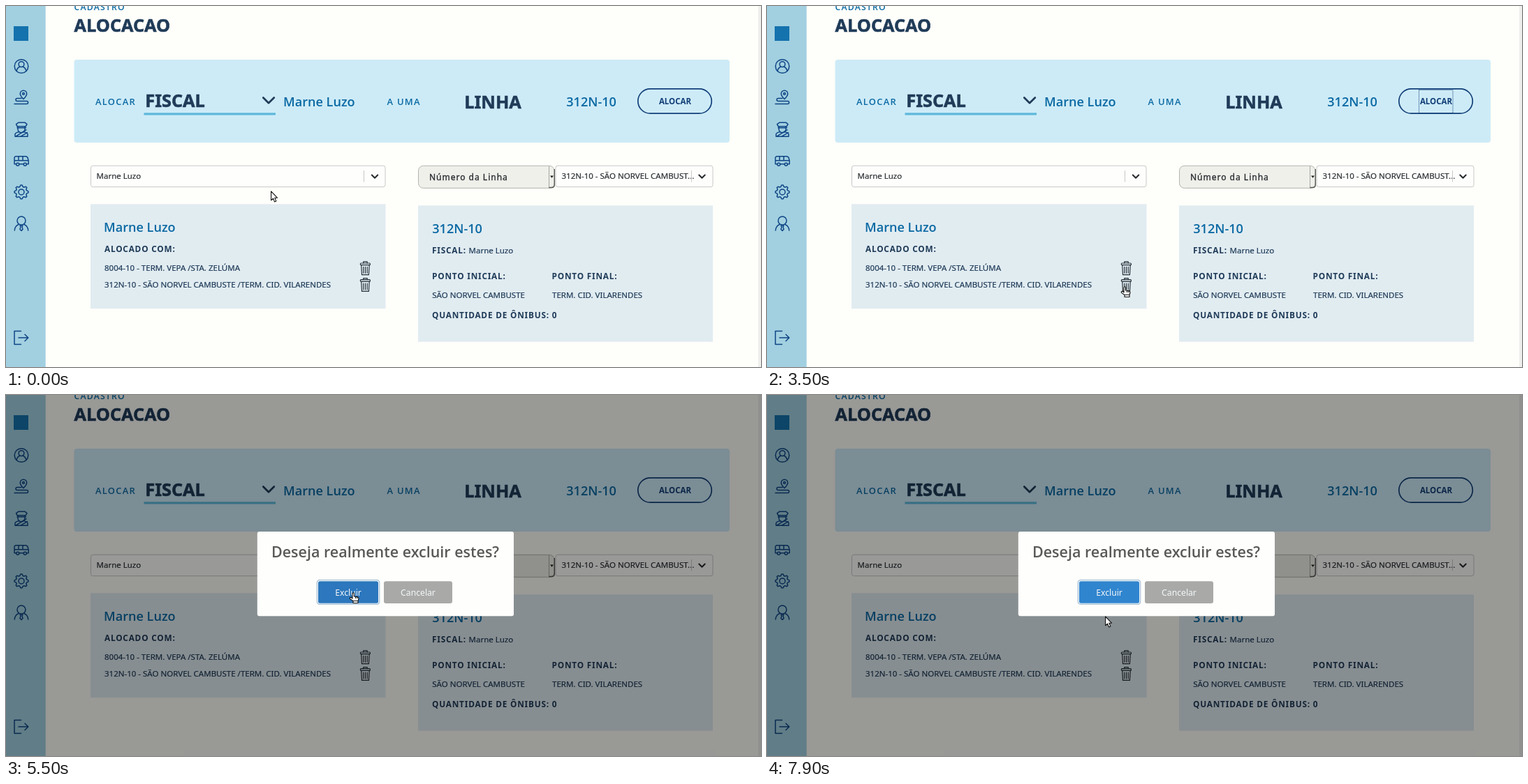
An HTML page for the animation above (8000 ms loop, 1081x518 px).

```html
<!DOCTYPE html>
<html lang="pt-BR">
<head>
<meta charset="utf-8">
<title>Alocação</title>
<style>
  html, body { margin: 0; width: 100%; height: 100%; overflow: hidden; background: #fefefa; }
  svg { display: block; width: 100%; height: 100%; }
  text { font: 500 11.5px "Noto Sans", "Open Sans", sans-serif; fill: #1f3b58; stroke: #1f3b58; stroke-width: .2; white-space: pre; }
  .heading { font-size: 25.3px; font-weight: 700; stroke-width: .6; }
  .name, .tag, .question { font-family: "Open Sans", "Noto Sans", sans-serif; font-weight: 600; stroke: none; }
  .name { font-size: 18.1px; fill: #0a69a3; }
  .tag { font-size: 12.9px; fill: #0a69a3; letter-spacing: .1em; }
  .crumb { font-size: 12.2px; }
  .label { font-size: 11.8px; font-weight: 700; letter-spacing: .8px; stroke: none; }
  .action { font-weight: 700; fill: #123f78; stroke: none; text-anchor: middle; }
  .value { fill: #2b2f33; stroke: #2b2f33; }
  .native { font-size: 12px; letter-spacing: 1px; stroke-width: .35; }
  .question { font-size: 21.5px; fill: #595958; text-anchor: middle; }
  .choice { font-size: 12.2px; font-weight: 400; fill: #f4f7f9; stroke: none; text-anchor: middle; }
  .line { fill: none; stroke: #0f4585; stroke-width: 1.5; stroke-linecap: round; stroke-linejoin: round; }
  .field { fill: #fefefc; stroke: #c8c9c8; }
  .chevron { fill: none; stroke: #2a2d30; stroke-width: 2.1; stroke-linecap: round; stroke-linejoin: round; }
  .pointer { fill: #fff; stroke: #111; stroke-width: 1.1; stroke-linejoin: round; }
</style>
</head>
<body>
<svg viewBox="0 0 1081 518" preserveAspectRatio="none">
  <defs>
    <path id="drop" class="chevron" d="M-4.2-2 0 2.2 4.2-2"/>
    <g id="trash" class="line" style="stroke:#27313b;stroke-width:1.2">
      <rect x=".7" y="2.7" width="14" height="2.7" rx="1"/>
      <path d="M5 2.7V.6H10.5V2.7M2 5.4 2.8 19.4H12.7L13.5 5.4M5 8V17M7.75 8V17M10.5 8V17"/>
    </g>
  </defs>

  <rect width="1081" height="518" fill="#fefefa"/>
  <rect x="1077" width="4" height="518" fill="#efefed"/>

  <rect width="56.7" height="518" fill="#a2d0e0"/>
  <rect x="11" y="29" width="21" height="21" fill="#1472ad"/>
  <g id="menu" class="line">
    <g>
      <circle r="9.8"/>
      <circle cy="-2.9" r="3.9"/>
      <path d="M-7 6.7Q-5.8 2-2.4.7M7 6.7Q5.8 2 2.4.7"/>
    </g>
    <g>
      <path d="M3 2Q-1.7-3-1.7-5.7A4.7 4.7 0 0 1 7.7-5.7Q7.7-3 3 2Z"/>
      <circle cx="3" cy="-5.7" r="1.4"/>
      <path d="M0 1H-6a2 2 0 0 0 0 4H7.6a2 2 0 0 1 0 4H-10"/>
    </g>
    <g>
      <path d="M-7.5-7-4-9.5H5L8-7 6.3-4H-6ZM-5-4V0A5 5 0 0 0 5 0V-4M-6-2H6.5"/>
      <path d="M-9 10.5V7Q-8 4.5-3 4M9 10.5V7Q8 4.5 3 4M-9 10.5H9M7 1-8 10.5M8.5 5-1 10.5"/>
    </g>
    <g>
      <path d="M-10 5V-4.5L-8.5-6H7L9-4.5 10.2.5V5ZM-10 0H10M-4-6V0M2-6V0"/>
      <circle cx="-5.2" cy="5.5" r="2" fill="#a2d0e0"/>
      <circle cx="5.3" cy="5.5" r="2" fill="#a2d0e0"/>
    </g>
    <g>
      <path id="gear"/>
      <circle r="4"/>
    </g>
    <g>
      <circle cy="-4" r="6"/>
      <path d="M-9.7 10Q-9.5 4-4 1.5M9.7 10Q9.5 4 4 1.5M-2 3H2L1 5 2 8.5 0 10.5-2 8.5-1 5Z"/>
    </g>
  </g>
  <path class="line" stroke-width="1.8" d="M21.5 466.5H12V485.5H21.5M18 476H31.5M27 471.2 31.8 476 27 480.8"/>

  <text class="tag crumb" x="97.5" y="6">CADASTRO</text>
  <text class="heading" x="97.5" y="37">ALOCACAO</text>

  <rect x="97.5" y="77" width="938.5" height="119" rx="4" fill="#cdebf7"/>
  <text class="tag" x="128" y="141.7">ALOCAR</text>
  <text class="heading" x="199.3" y="145">FISCAL</text>
  <path d="M368.3 131.5 376 139.2 383.8 131.5" class="chevron" style="stroke:#1f3b58;stroke-width:2.7"/>
  <rect x="197.5" y="153.3" width="188.5" height="3.2" fill="#5db8dc"/>
  <text class="name" x="397" y="144">Marne Luzo</text>
  <text class="tag" x="545.5" y="141.7">A UMA</text>
  <text class="heading" x="656.2" y="147">LINHA</text>
  <text class="name" x="802.3" y="144">312N-10</text>
  <rect x="904.8" y="118.8" width="105.5" height="35.4" rx="17.7" class="line" style="stroke:#123f78;stroke-width:1.7"/>
  <text class="action" x="958" y="141">ALOCAR</text>
  <rect id="focus" x="933.5" y="120.5" width="48.5" height="33" fill="none" stroke="#123f78" stroke-dasharray="1 1"/>

  <rect x="121.5" y="229.2" width="421.5" height="30.4" rx="3" class="field"/>
  <text class="value" x="129.5" y="248.3">Marne Luzo</text>
  <use href="#drop" x="528" y="244.5"/>

  <rect x="590.5" y="229.3" width="194.5" height="32" rx="7" fill="#f0f0eb" stroke="#b4b4b0"/>
  <text class="value native" x="606" y="250">Número da Linha</text>
  <path d="M777.5 230V261" stroke="#a5a5a2"/>
  <path d="M777.5 260.5H782Q785.3 260 785.3 257V234" fill="none" stroke="#555553" stroke-width="1.3"/>
  <path d="M779 243.5H784L781.5 246.7Z" fill="#222"/>
  <rect x="787" y="229.2" width="225" height="30.4" rx="3" class="field"/>
  <text class="value" x="795.5" y="248.3">312N-10 - SÃO NORVEL CAMBUST...</text>
  <use href="#drop" x="996.5" y="244.5"/>
  <path d="M512.5 236V252.5M981.5 236V252.5" stroke="#c8c9c8"/>

  <rect x="121" y="284.3" width="422.5" height="150" fill="#e1ecf1"/>
  <text class="name" x="140" y="323.8">Marne Luzo</text>
  <text class="label" x="141" y="353.2">ALOCADO COM:</text>
  <text x="141" y="380.3">8004-10 - TERM. VEPA /STA. ZELÚMA</text>
  <text x="141" y="404.1">312N-10 - SÃO NORVEL CAMBUSTE /TERM. CID. VILARENDES</text>
  <use href="#trash" x="506.7" y="366.3"/>
  <use href="#trash" x="506.7" y="390"/>

  <rect x="590" y="286.3" width="422" height="195.5" fill="#e1ecf1"/>
  <text class="name" x="610.3" y="325.8">312N-10</text>
  <text class="label" x="610" y="355">FISCAL:</text>
  <text x="662.5" y="355">Marne Luzo</text>
  <text class="label" x="610" y="391.8">PONTO INICIAL:</text>
  <text class="label" x="781.5" y="391.8">PONTO FINAL:</text>
  <text x="610.3" y="418.7">SÃO NORVEL CAMBUSTE</text>
  <text x="782" y="418.7">TERM. CID. VILARENDES</text>
  <text class="label" x="610" y="448">QUANTIDADE DE ÔNIBUS: 0</text>

  <g id="modal">
    <rect width="1081" height="518" fill="#000" fill-opacity=".4"/>
    <rect x="359.8" y="196" width="367.2" height="121.3" rx="3" fill="#fefefc"/>
    <text class="question" x="543" y="233.3">Deseja realmente excluir estes?</text>
    <rect x="445.4" y="265.6" width="89.2" height="34.6" rx="3.5" fill="none" stroke="#adc5da" stroke-width="1.5"/>
    <rect id="confirm" x="447" y="267.2" width="86" height="31.5" rx="2.5"/>
    <text class="choice" x="490" y="287.6">Excluir</text>
    <rect x="541" y="267.2" width="98" height="31.8" rx="3" fill="#a9aaa8"/>
    <text class="choice" x="590" y="287.6">Cancelar</text>
  </g>

  <g id="cursor" class="pointer">
    <path id="arrow" d="M.6.8V13.8L3.5 11.1 5.5 15.9 7.8 14.9 5.8 10.3H9.6Z"/>
    <path id="hand" d="M5 9V2a1.2 1.2 0 0 1 2.4 0V6L12 6.5Q14 7 14 9L13 12.5V15.5H6V12.5L1.4 9.4Q1 7 3 7.5ZM6 12.5H13M9.5 6.5V9M11.7 6.5V9"/>
  </g>
</svg>
<script>
  const LOOP = 8000, TICK = 100;
  const el = id => document.getElementById(id);
  const show = (id, on) => { el(id).style.display = on ? "" : "none"; };
  const within = (t, from, to) => t >= from && t < to;
  const easeOut = p => 1 - (1 - p) ** 4;

  // Menu icons are drawn around their own centres and stacked evenly.
  [...el("menu").children].forEach((icon, i) =>
    icon.setAttribute("transform", `translate(22 ${86.5 + i * 45.1})`));

  // Eight-toothed outline.
  el("gear").setAttribute("d", "M" + Array.from({ length: 32 }, (_, i) => {
    const radius = i % 4 < 2 ? 10 : 7.8;
    const angle = (i - .5) * Math.PI / 16;
    return [radius * Math.cos(angle), radius * Math.sin(angle)].map(v => v.toFixed(2));
  }).join("L") + "Z");

  // Each glide starts at a time, takes some ticks and ends at a point.
  const glide = (at, ticks, x, y) => ({ at, ticks, x, y });
  const glides = [
    glide(0, 1, 379, 265),
    glide(600, 2, 443, 312),
    glide(900, 4, 524, 402),
    glide(1400, 4, 504, 393),
    glide(1900, 3, 506, 402),
    glide(4500, 1, 580, 328),
    glide(4700, 4, 571, 313),
    glide(5200, 1, 521, 283),
    glide(5400, 2, 491, 283),
    glide(6000, 1, 518, 288),
    glide(6200, 6, 174, 391),
    glide(7000, 3, 680, 346),
    glide(7400, 2, 736, 356),
    glide(7700, 1, 675, 345),
    glide(7900, 1, 484, 317)
  ];

  function cursorAt(t) {
    const i = glides.findLastIndex(g => g.at <= t);
    const to = glides[i], from = glides[Math.max(i - 1, 0)];
    const tick = Math.floor((t - to.at) / TICK) + 1;
    const p = easeOut(Math.min(tick / to.ticks, 1));
    return ["x", "y"].map(k => Math.round(from[k] + (to[k] - from[k]) * p));
  }

  function draw() {
    const t = performance.now() % LOOP;
    const overConfirm = within(t, 5200, 6200);
    const pointing = overConfirm || within(t, 1500, 4500);
    el("cursor").setAttribute("transform", `translate(${cursorAt(t)})`);
    show("hand", pointing);
    show("arrow", !pointing);
    show("focus", within(t, 3500, 4500));
    show("modal", t >= 4500);
    el("confirm").setAttribute("fill", overConfirm ? "#2c77bd" : "#3085cf");
    requestAnimationFrame(draw);
  }
  draw();
</script>
</body>
</html>
```
